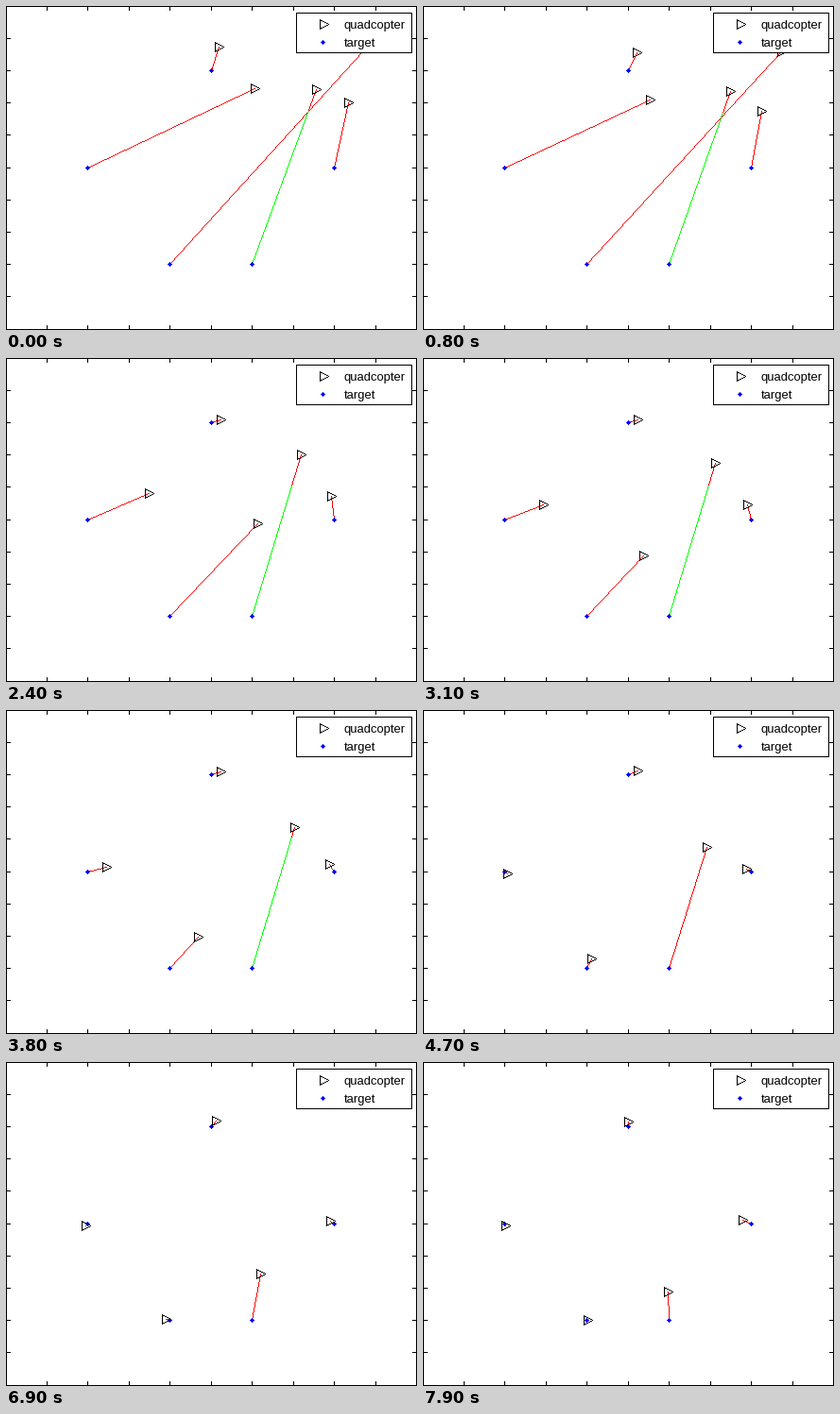
Animation of 435x343 px, one loop 8000 ms. Source, as a matplotlib script:

```python
import numpy as np
import matplotlib.pyplot as plt
from matplotlib.animation import FuncAnimation

W, H, DPI = 435, 343, 64
FRAMES, STEP = 80, 100
PX = 72 / DPI  # one pixel in points

BLACK, WHITE = (0, 0, 0), (255, 255, 255)
RED, GREEN, BLUE = (255, 0, 0), (0, 255, 0), (0, 0, 255)

# each quadcopter: its target, then a few way points reached at TIMES
TIMES = np.array([0, 24, 47, 60, 79])
FLIGHTS = [
    ((217, 68), [225 + 43j, 227 + 65j, 227 + 64j, 225 + 61j, 217 + 63j]),
    ((86, 171), [263 + 87j, 151 + 143j, 89 + 173j, 82 + 173j, 87 + 173j]),
    ((173, 273), [407 + 15j, 266 + 175j, 178 + 263j, 167 + 271j, 174 + 273j]),
    ((347, 171), [362 + 102j, 344 + 146j, 342 + 168j, 345 + 168j, 338 + 167j]),
    ((260, 273), [328 + 88j, 312 + 102j, 300 + 145j, 279 + 203j, 259 + 243j]),
]


def ease(v, f):
    """Monotone cubic through the values v, starting from rest."""
    h = np.diff(TIMES)
    d = np.diff(v) / h
    a, b = d[:-1], d[1:]
    turn = a * b <= 0
    mid = np.where(turn, 0, 2 * a * b / np.where(turn, 1, a + b))
    m = np.concatenate([[0], mid, d[-1:]])
    i = min(np.searchsorted(TIMES, f, side="right") - 1, len(h) - 1)
    s = (f - TIMES[i]) / h[i]
    k = s * s * (3 - 2 * s)
    return (v[i] * (1 - k) + v[i + 1] * k
            + h[i] * s * (1 - s) * (m[i] * (1 - s) - m[i + 1] * s))


def position(points, f):
    p = np.array(points)
    return round(ease(p.real, f)), round(ease(p.imag, f))


def trace(x0, y0, x1, y1):
    """Columns and rows of a one-pixel line."""
    n = max(abs(x1 - x0), abs(y1 - y0)) + 1
    return (np.rint(np.linspace(x0, x1, n)).astype(int),
            np.rint(np.linspace(y0, y1, n)).astype(int))


def line(img, x0, y0, x1, y1, color=BLACK):
    xs, ys = trace(x0, y0, x1, y1)
    img[ys, xs] = color


def box(img, x0, y0, x1, y1):
    img[y0:y1 + 1, x0:x1 + 1] = BLACK
    img[y0 + 1:y1, x0 + 1:x1] = WHITE


def dot(img, x, y):
    for r in range(-2, 3):
        w = 2 - abs(r)
        img[y + r, x - w:x + w + 1] = BLUE


def triangle(img, x, y):
    line(img, x - 4, y - 5, x - 4, y + 5)
    line(img, x + 5, y, x - 4, y - 5)
    line(img, x + 5, y, x - 4, y + 5)


def legend(img):
    box(img, 307, 7, 429, 49)
    triangle(img, 336, 19)
    dot(img, 335, 38)


def blank():
    img = np.empty((H, W, 3), np.uint8)
    box(img, 0, 0, W - 1, H - 1)
    for k in range(1, 10):
        x, y = int(43.45 * k), int(34.2 * k)
        img[:5, x] = img[-5:, x] = BLACK
        img[y, :5] = img[y, -5:] = BLACK
    return img


def render(f):
    img = base.copy()
    spots = [position(points, f) for _, points in FLIGHTS]
    for (target, _), spot in zip(FLIGHTS, spots):
        line(img, *target, *spot, RED)

    # the last link is green below a joint until its quadcopter passes it
    joint = min(110 + f * f / 23, 134.5)
    if spot[1] < joint:
        xs, ys = trace(*target, *spot)
        low = ys > joint
        img[ys[low], xs[low]] = GREEN

    for (target, _), spot in zip(FLIGHTS, spots):
        dot(img, *target)
        triangle(img, *spot)
    legend(img)
    return img


base = blank()
fig = plt.figure(figsize=(W / DPI, H / DPI), dpi=DPI, facecolor="white")
ax = fig.add_axes([0, 0, 1, 1])
ax.axis("off")
view = ax.imshow(render(0), extent=(0, W, H, 0), aspect="auto",
                 interpolation="nearest")
for label, baseline in (("quadcopter", 24), ("target", 43)):
    ax.text(358, baseline, label, family="Liberation Sans", size=13 * PX,
            va="baseline")


def update(f):
    view.set_data(render(f))
    return [view]


anim = FuncAnimation(fig, update, frames=FRAMES, interval=STEP,
                     repeat=True, repeat_delay=0, blit=False)
plt.show()
```
